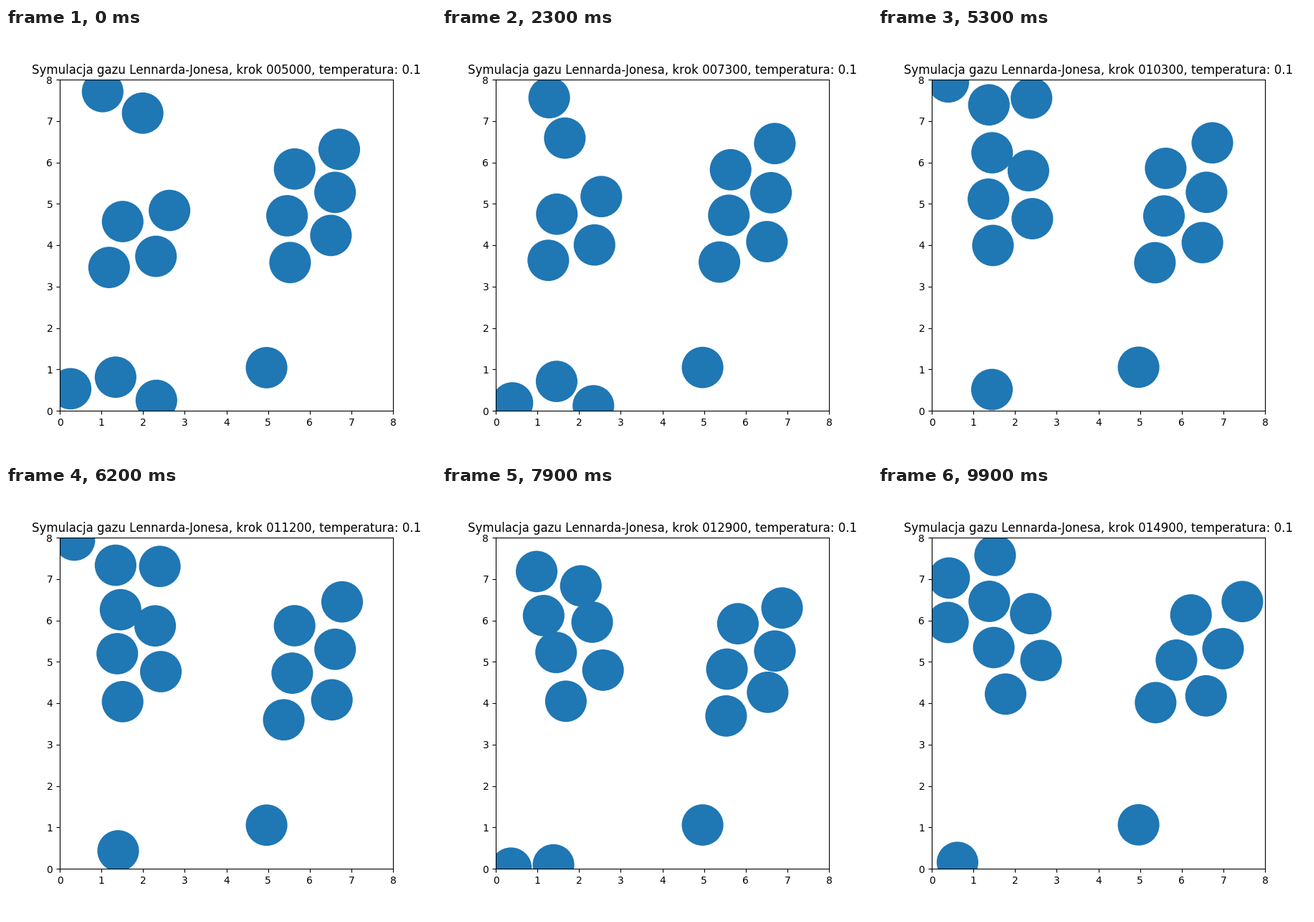
Animation, 600 px wide and 600 px high, one loop 10000 ms. Source, as a matplotlib script:

```python
import numpy as np
import matplotlib.pyplot as plt
from matplotlib.animation import FuncAnimation
from matplotlib.patches import Circle

plt.rcParams["text.kerning_factor"] = 6

BOX = 8
FRAMES = 100
LAST = FRAMES - 1

# Loose particles travel through four waypoints, unwrapped across the box edge
STOPS = np.array([0, 39, 70, LAST])
LOOSE = np.array([
    [1.03 + 7.71j, 1.39 + 7.48j, 1.21 + 7.27j, 0.41 + 7.00j],
    [1.99 + 7.19j, 1.46 + 6.29j, 1.37 + 6.21j, 0.37 + 5.93j],
    [2.32 + 8.25j, 2.36 + 7.93j, 2.29 + 7.06j, 1.36 + 6.46j],
    [0.26 + 8.53j, 0.43 + 8.03j, 0.33 + 7.97j, 0.60 + 8.16j],
    [1.34 + 8.81j, 1.47 + 8.58j, 1.37 + 8.30j, 1.54 + 7.59j],
])
SLOPE = np.gradient(LOOSE, STOPS, axis=1)

rng = np.random.default_rng(4)
RATE = 2 * np.pi / rng.uniform(7, 12, (2, 15))


def ease(i, start, end):
    u = np.clip((i - start) / (end - start), 0, 1)
    return u * u * (3 - 2 * u)


def loose(i):
    """Cubic Hermite curve through the waypoints."""
    k = min(np.searchsorted(STOPS, i, side="right") - 1, len(STOPS) - 2)
    span = STOPS[k + 1] - STOPS[k]
    u = (i - STOPS[k]) / span
    blend = u * u * (3 - 2 * u)
    return ((1 - blend) * LOOSE[:, k] + blend * LOOSE[:, k + 1]
            + u * (1 - u) * span * ((1 - u) * SLOPE[:, k] - u * SLOPE[:, k + 1]))


def rhombus(i):
    """Four bound particles that rise while turning."""
    rise, side, late = ease(i, 0, 65), ease(i, 65, 90), (i / LAST) ** 6
    centre = 1.91 + 4.15j + 0.8j * rise + 0.16 * side + 0.24j * late
    turn = 0.76 + 0.42 * rise + 0.1 * side
    arms = np.array([1, -0.58j, -1, 0.58j])
    return centre + arms * np.exp(1j * turn)


def zigzag(i):
    """Six bound particles that breathe, then tilt and slide away."""
    k = np.arange(6)
    right = k % 2
    beat = np.cos(2 * np.pi * i / 38)
    x = 5.43 + 0.05 * k + 1.03 * right + 0.1 * beat * (1 - right) * np.cos(1.2 * k)
    y = 3.58 + 0.565 * k - 0.045 * beat * right * (k - 3)
    late = (i / LAST) ** 6
    mid = 6.07 + 4.99j
    return mid + (x + 1j * y - mid) * np.exp(-0.27j * late) + (0.35 + 0.18j) * late


def positions(i):
    bound = np.concatenate([loose(i), rhombus(i), zigzag(i)])
    jitter = 0.025 * np.sin(RATE * i)
    lone = 4.965 + 1j * (1.04 + 0.02 * i / LAST)
    p = np.append(bound + jitter[0] + 1j * jitter[1], lone)
    return np.column_stack([p.real, p.imag]) % BOX


fig, ax = plt.subplots(figsize=(6, 6), dpi=100)
ax.set_xlim(0, BOX)
ax.set_ylim(0, BOX)
title = ax.set_title("")
discs = [ax.add_patch(Circle(p, 0.5, facecolor="C0", linewidth=0))
         for p in positions(0)]


def update(i):
    for disc, p in zip(discs, positions(i)):
        disc.center = p
    title.set_text("Symulacja gazu Lennarda-Jonesa, "
                   f"krok {5000 + 100 * i:06d}, temperatura: 0.1")
    return [*discs, title]


anim = FuncAnimation(fig, update, frames=FRAMES, interval=100,
                     repeat=True, repeat_delay=0)
plt.show()
```
